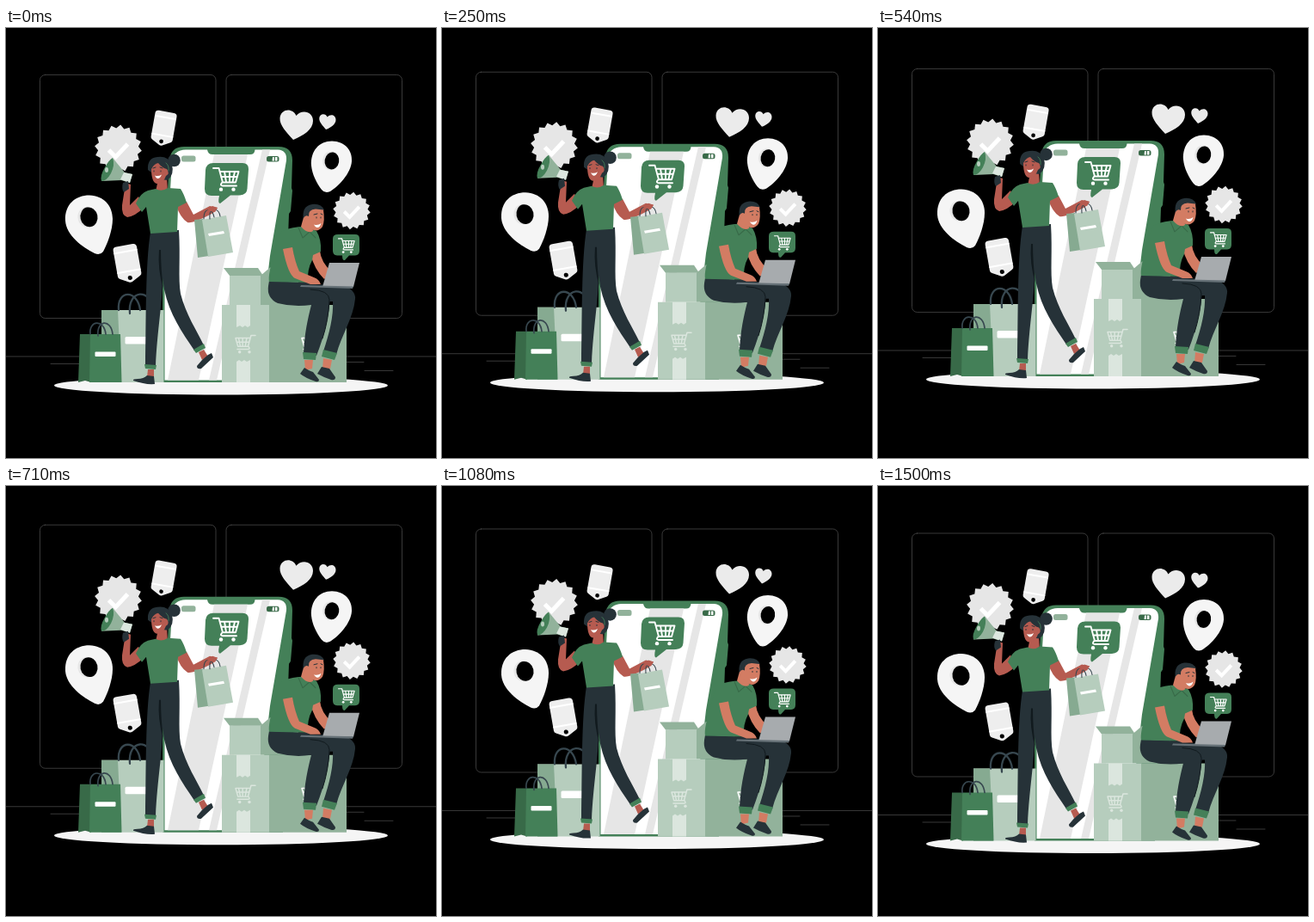
Animation of 500x500 px, one loop 1.54 s. Source, as an HTML page:

```html
<!DOCTYPE html>
<html lang="en">
<head>
<meta charset="utf-8">
<title>Online shopping</title>
<style>
html, body { margin: 0; height: 100%; overflow: hidden; background: #000; }
svg { display: block; width: 100vw; height: 100vh; }
.line { fill: none; stroke-linecap: round; stroke-linejoin: round; }
.green { fill: #448058; } .deep { fill: #386a48; } .mid { fill: #92b29b; } .side { fill: #86aa91; } .light { fill: #b6cdbd; }
.dark { fill: #263238; } .white { fill: #fff; } .pale { fill: #f5f5f5; } .grey { fill: #e6e6e6; }
.rose { fill: #b65b50; } .tan { fill: #d37c63; }
</style>
</head>
<body>
<svg viewBox="0 0 500 500">
  <defs>
    <g id="cart">
      <path class="line" stroke="currentColor" stroke-width="1.900" d="M0 0H6.500L11 16.500M7.500 4H29.500L26 16.500H10.500Q7 20.500 11 20.500H27M9 10H28M13 4L15 16M19 4V16M25 4L22.500 16"/>
      <g fill="currentColor"><circle cx="9" cy="24.700" r="2.200"/><circle cx="23.500" cy="24.700" r="2.200"/></g>
    </g>
    <path id="check" class="line" stroke="#fff" stroke-width="5" style="stroke-linecap:butt;stroke-linejoin:miter" d="M-11 0L-3 8L11 -7"/>
    <g id="tag">
      <path fill="#eee" d="M-9 -20H9Q13 -20 13 -16V13Q13 15 11 16L2 21Q0 22 -2 21L-11 16Q-13 15 -13 13V-16Q-13 -20 -9 -20Z"/>
      <path class="line" stroke="#fff" stroke-width="2" d="M-12 -13H12M-12 9H12"/>
      <circle cy="16.500" r="2.400"/>
    </g>
  </defs>

  <g id="scene">
    <g class="line" stroke="#484848" stroke-width=".8">
      <rect x="39.500" y="54.500" width="204.500" height="283" rx="6"/>
      <rect x="256" y="54.500" width="204.500" height="283" rx="6"/>
      <path d="M0 382H500M52 390.500H86M396 388.500H416M417 398.500H450"/>
    </g>
    <ellipse class="pale" cx="250" cy="415.700" rx="194" ry="10.800"/>

    <!-- floating symbols -->
    <g id="badges"></g>
    <use href="#check" x="130.500" y="142"/>
    <use href="#check" transform="translate(402 213.500) scale(.8)"/>
    <use href="#tag" transform="translate(183.300 116.300) rotate(10) scale(.98 .96)"/>
    <use href="#tag" transform="translate(141.300 273.500) rotate(-10) scale(1.070 1.050)"/>
    <path class="pale" d="M69 224C68 205 81 194.500 97 194.500C114 195 124 207 124 222C124 235 118 251 113 260Q109 265 103 262C89 255 70 241 69 224Z"/>
    <ellipse class="grey" cx="94.500" cy="220" rx="11" ry="12" transform="rotate(-12 94 220)"/>
    <ellipse cx="96.500" cy="220" rx="10" ry="11.500" transform="rotate(-12 96 220)"/>
    <path class="pale" d="M355 160C354 143 364 131.500 379 131.500C394 132 403 142 402 155C401 169 387 184 377 190Q371 193 367 188C361 180 356 170 355 160Z"/>
    <ellipse class="grey" cx="377.500" cy="154.500" rx="9.500" ry="11"/>
    <ellipse cx="379" cy="154.500" rx="8.300" ry="10" transform="rotate(10 379 154)"/>
    <path id="heart" fill="#ebebeb" d="M334 130C326 121 318 113 318.500 105C319 94 333 92 337.500 102C344 94 357 97 357 108C357 118 346 125 334 130Z"/>
    <use href="#heart" transform="translate(205 50.500) scale(.5 .52)"/>

    <!-- phone -->
    <path class="green" d="M207 138H317Q333 138 333 154L332 186L333 189L331 213L329 216L322 412H182V300L190 153Q192 138 207 138Z"/>
    <path class="white" d="M209 141.500H234Q235 147 240 147H284Q289 147 289.500 141.500H316Q327 142 326 154L307 265L290 409.500H184.500V300L193 154Q195 142 209 141.500Z"/>
    <path class="grey" d="M242 147H281L224 409.500H188ZM298 141.500H307L245 409.500H236Z"/>
    <rect class="mid" x="204" y="148.500" width="16.500" height="7" rx="2.500"/>
    <rect class="deep" x="303" y="149" width="14.500" height="6.500" rx="2.500"/>
    <path class="white" d="M310 150H312V154.500H309.500ZM313 150H315.500V154.500H313Z"/>
    <path class="green" d="M241 157H275Q282 157 282 164L280.500 187Q280 194 272 194.500H261L249 204Q246 204 248 195H239Q231 195 231 187L232 165Q233 157 241 157Z"/>
    <use href="#cart" color="#fff" x="241" y="163"/>

    <!-- bags on the floor -->
    <path class="light" d="M111 328H183.500V412H111Z"/>
    <path class="side" d="M111 328H130L134 412H111Z"/>
    <rect class="white" x="138.500" y="359" width="34" height="8.500" rx="1.500"/>
    <path class="line" stroke="#37474f" stroke-width="2.300" d="M131 328C129 304 153 304 156 328M144 332C141 304 169 302 170 328"/>
    <path class="deep" d="M86 356H99V412L92 410L84 412Z"/>
    <path class="green" d="M98 356H133L134.500 412H97Z"/>
    <rect class="white" x="103.500" y="376.500" width="24" height="5.500" rx="1"/>
    <path class="line" stroke="#37474f" stroke-width="1.700" d="M98 356C96 340 114 338 116 356M107 358C105 339 122 338 124 356"/>

    <!-- boxes -->
    <path class="mid" d="M296 288L307 278.500H340V322H296Z"/>
    <path class="light" d="M260 288H296V322H260Z"/>
    <path class="mid" d="M253 279H293L299 288H260Z"/>
    <path class="light" d="M251 322H306.500V412H251Z"/>
    <path class="mid" d="M306 322H396V412H306Z"/>
    <path fill="#dbe6de" d="M268 322H284V346L281 348L278 346L275 348L272 346L268 348ZM268 388L271 386L274 388L277 386L280 388L284 386V412H268Z"/>
    <use href="#cart" color="#dbe6de" transform="translate(290 357.500) scale(-.78 .78)"/>
    <use href="#cart" color="#fff" transform="translate(367 357.500) scale(-.78 .78)"/>

    <!-- woman -->
    <path class="rose" d="M154 196L160 209Q150 219 141 220Q134 218 135 206L138 187Q140 179 145 182L144 206Z"/>
    <path class="mid" d="M124 151L138 168L147 170L144 180L134 177L111 178Z"/>
    <path class="green" d="M124 151Q127 159 122 169Q117 178 111 178Q109 172 115 162Q120 153 124 151Z"/>
    <ellipse class="light" cx="117" cy="165" rx="2" ry="3"/>
    <path fill="#dce7df" d="M137 168L147 170L144 180L133 176Z"/>
    <path class="dark" d="M136 180L142 178L143 187L137 191Q134 187 136 180Z"/>
    <path class="rose" d="M203 200L198 206Q202 220 211 226Q217 228 241 215L246 209L237 207L218 217L210 202Z"/>
    <path class="dark" d="M168 237L201 235C203 267 200 291 203 309C209 333 222 352 230 369L219 375C205 354 190 333 184 304L182 290C182 320 176 350 174 393L162 392C163 336 162 275 168 237Z"/>
    <path d="M178 258Q176 280 183 304Q180 280 180 258Z" fill="#111a1e"/>
    <path class="green" d="M161 391L175 392L174 397L162 396ZM218 374L230 367L232 372L221 378Z"/>
    <path class="rose" d="M165 397H172V406H164ZM224 377L230 374L235 382L228 386Z"/>
    <path class="dark" d="M164 404L172 405L173 414Q162 415 148 410Q147 408 153 408Q160 408 164 404ZM228 386L235 380L239 378L241 383L227 396Q222 397 222 393Z"/>
    <path class="rose" d="M177 176L187 172L188 190Q182 194 174 190Z"/>
    <path class="green" d="M165 189L174 187Q181 191 188 186L203 187Q207 193 210 203L200 208L199 237L168 239L163 208L158 214L151 204Q156 192 165 189Z"/>
    <path class="dark" d="M165 165Q164 151 176 150Q188 148 193 159Q196 170 188 177L180 176Z"/>
    <circle class="dark" cx="195.500" cy="154" r="7.300"/>
    <path class="rose" d="M169 164Q172 158 177 157Q182 163 187 164Q191 169 186 172Q183 181 175 181Q169 179 169 164Z"/>
    <path class="white" d="M173 171.500Q177 173 181 170.500Q179 175.500 176 175Q174 174 173 171.500Z"/>
    <path class="line" stroke="#263238" stroke-width="1" d="M171 163L174 162M179 162L182 163M172 166V167M180 166V167"/>
    <path class="line" stroke="#448058" stroke-width=".9" d="M186 157Q190 160 189 166"/>

    <!-- carried bag -->
    <path class="side" d="M219 223L229 222L236 265L223 267Z"/>
    <path class="light" d="M228 223L256 218L264 261L235 266Z"/>
    <path class="white" d="M235 239L253 236L254 239L236 242Z"/>
    <path class="line" stroke="#37474f" stroke-width="1.100" d="M230 222Q230 210 237 212Q241 214 242 220M237 222Q236 209 243 211Q248 212 249 219"/>
    <path class="rose" d="M233 213L240 207L246 209L243 214L238 213L234 217Z"/>

    <!-- man -->
    <path class="tan" d="M354 245L365 259Q366 272 379 284L370 292Q358 280 354 262Z"/>
    <path class="dark" d="M350 298L392 299Q407 305 406 315C404 337 390 357 384 380L369 376C376 355 381 335 380 318L340 318Z"/>
    <path class="dark" d="M306 294L349 296Q374 299 377 310Q376 343 361 381L346 379C347 355 351 338 355 322Q335 325 316 320Q303 314 305 300Z"/>
    <path class="line" stroke="#111a1e" stroke-width="1" d="M354 304Q376 305 376 316Q375 340 368 361"/>
    <path class="green" d="M345 377L361 378L360 386L346 385ZM369 374L385 378L382 386L367 382Z"/>
    <path class="tan" d="M347 386H357L356 396L348 398ZM369 384L379 386L377 396L368 397Z"/>
    <path class="dark" d="M347 395Q353 399 357 400L364 409Q364 412 360 411Q348 407 342 402ZM367 394L376 396L383 406Q383 410 378 409Q369 406 362 402Z"/>
    <path class="green" d="M321 236Q333 231 347 231L361 236Q367 246 366 260L357 264L356 270Q350 281 351 296L306 295Q304 287 314 255Q317 241 321 236Z"/>
    <path class="line" stroke="#386a48" stroke-width="1.100" d="M340 232L345 244L353 237L360 244M333 258L337 278"/>
    <path class="tan" d="M346 220L356 228L357 236Q351 240 343 231Z"/>
    <path class="dark" d="M346 224Q343 207 356 205Q367 204 370 212L360 214L353 222Z"/>
    <path class="tan" d="M352 219Q351 211 360 210.500L369 211.500Q371 224 368 231Q363 238 355 234L350 228Q345 226 346 221Q348 217 352 219Z"/>
    <path class="white" d="M358 228.500Q363 230 366.500 227Q365 232.500 361.500 232Q359 231 358 228.500Z"/>
    <path class="line" stroke="#263238" stroke-width="1" d="M358 217L362 216M366 216L368 217M361 220V221M366 220V221"/>
    <path class="tan" d="M322 257L333 255Q336 272 341 283L358 290Q364 292 366 298H354L336 291Q328 287 322 257Z"/>
    <path fill="#a7abae" d="M376 273H411L404 301H368Z"/>
    <path fill="#667177" d="M343 299L404 300.500L403 303L342 301Z"/>

    <path class="green" d="M386 240H406Q411 240 411 245V259Q411 264 406 264.500H399L394 270Q391 271 391 264.500H385Q380 264 380 259V245Q380 240 386 240Z"/>
    <use href="#cart" color="#fff" transform="translate(386.500 245) scale(.63)"/>
  </g>
</svg>
<script>
const LOOP = 1540, LEAD = 55, RISE = 10, BASE = 0.7;
const scene = document.getElementById('scene');

function badge(cx, cy, outer, inner, points) {
  const corners = Array.from({ length: points * 2 }, (_, i) => {
    const angle = Math.PI * (i + 0.5) / points, r = i % 2 ? inner : outer;
    return `${cx + r * Math.cos(angle)},${cy + r * Math.sin(angle)}`;
  });
  return `<polygon class="grey" points="${corners.join(' ')}"/>`;
}
document.getElementById('badges').innerHTML =
  badge(130.5, 140, 27.5, 23.5, 16) + badge(402, 212.5, 21.8, 18.6, 16);

// Linear float: up for half the loop, down for the other half.
function draw(now) {
  const phase = ((now + LEAD) % LOOP) / LOOP;
  const lift = 1 - Math.abs(1 - 2 * phase);
  scene.setAttribute('transform', `translate(0 ${BASE - RISE * lift})`);
  requestAnimationFrame(draw);
}
draw(performance.now());
</script>
</body>
</html>
```
